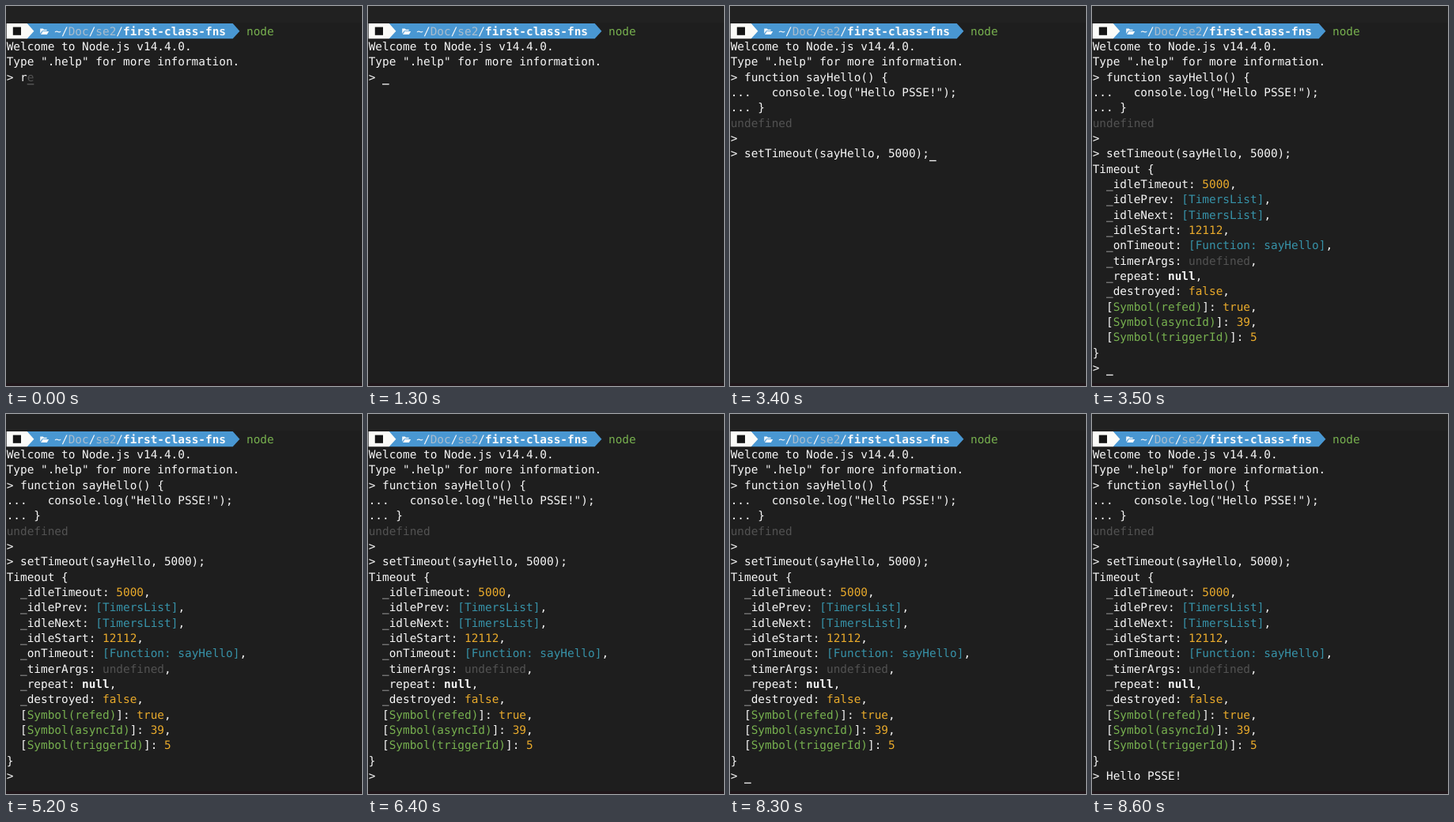
Recreate the animation shown at these times as an HTML page. Size 450x480 px, loop 9800 ms.

```html
<!DOCTYPE html>
<html lang="en">
<head>
<meta charset="utf-8">
<title>Terminal session</title>
<style>
html, body { margin: 0; width: 100%; height: 100%; overflow: hidden; background: #1e1e1e; }
svg { display: block; width: 450px; height: 480px; }
text { font: 14.4px "DejaVu Sans Mono", monospace; white-space: pre; text-rendering: geometricPrecision; }
.w { fill: #f6f6f6; }
.b { fill: #fafafa; font-weight: bold; }
.d { fill: #a9bdce; }
.u { fill: #525252; }
.n { fill: #e9aa2b; }
.t { fill: #3792a8; }
.g { fill: #77b04f; }
</style>
</head>
<body>
<svg id="stage" viewBox="0 0 450 480" xmlns="http://www.w3.org/2000/svg">
  <rect width="450" height="480" fill="#1e1e1e"/>
  <rect width="450" height="21" fill="#212121"/>
  <rect y="476.5" width="450" height="3.5" fill="#20161a"/>
  <path d="M26.7 22H286.7L295.4 31.7 286.7 41.3H26.7Z" fill="#4997d2"/>
  <path d="M.7 22H26.7L35.4 31.7 26.7 41.3H.7Z" fill="#fbfbf8"/>
  <rect x="8.8" y="26.6" width="10.2" height="10.2" fill="#151515"/>
  <path d="M43.2 35V28.6H46.8L47.9 29.8H51.6V31.2H45.8ZM44 36L46.4 32H54.2L51.9 36Z" fill="#f4f8fb"/>
</svg>
<script>
const LOOP = 9800, X0 = 0.7, Y0 = 22, CW = 8.667, LH = 19.333;
const NS = "http://www.w3.org/2000/svg";
const stage = document.getElementById("stage");

function add(parent, tag, attrs) {
  const el = document.createElementNS(NS, tag);
  for (const k in attrs) el.setAttribute(k, attrs[k]);
  return parent.appendChild(el);
}

const colX = col => X0 + col * CW;

// Each part is "style:text", placed on the character grid.
function print(group, row, col, ...parts) {
  for (const part of parts) {
    const str = part.slice(2);
    add(group, "text", { class: part[0], x: colX(col), y: Y0 + row * LH + 14.6 }).textContent = str;
    col += str.length;
  }
}

const layer = () => add(stage, "g", {});
const intro = layer(), draft = layer(), paste = layer(), result = layer(), hello = layer();

print(intro, 0, 7, "w:~/", "d:Doc", "w:/", "d:se2", "w:/", "b:first-class-fns");
print(intro, 0, 35, "g:node");
print(intro, 1, 0, "w:Welcome to Node.js v14.4.0.");
print(intro, 2, 0, 'w:Type ".help" for more information.');
print(intro, 3, 0, "w:>");

print(draft, 3, 2, "w:r", "u:e");

print(paste, 3, 2, "w:function sayHello() {");
print(paste, 4, 0, 'w:...   console.log("Hello PSSE!");');
print(paste, 5, 0, "w:... }");
print(paste, 6, 0, "u:undefined");
print(paste, 7, 0, "w:>");
print(paste, 8, 0, "w:> setTimeout(sayHello, 5000);");

print(result, 9, 0, "w:Timeout {");
[
  ["w:_idleTimeout: ", "n:5000", "w:,"],
  ["w:_idlePrev: ", "t:[TimersList]", "w:,"],
  ["w:_idleNext: ", "t:[TimersList]", "w:,"],
  ["w:_idleStart: ", "n:12112", "w:,"],
  ["w:_onTimeout: ", "t:[Function: sayHello]", "w:,"],
  ["w:_timerArgs: ", "u:undefined", "w:,"],
  ["w:_repeat: ", "b:null", "w:,"],
  ["w:_destroyed: ", "n:false", "w:,"],
  ["w:[", "g:Symbol(refed)", "w:]: ", "n:true", "w:,"],
  ["w:[", "g:Symbol(asyncId)", "w:]: ", "n:39", "w:,"],
  ["w:[", "g:Symbol(triggerId)", "w:]: ", "n:5"]
].forEach((parts, i) => print(result, 10 + i, 2, ...parts));
print(result, 21, 0, "w:}");
print(result, 22, 0, "w:>");

print(hello, 22, 2, "w:Hello PSSE!");

const cursor = add(stage, "rect", { width: CW, height: 1.3 });

// Cursor timeline: start, row, column, visible
const moves = [
  [0, 3, 3, 1], [600, 3, 2, 1], [1100, 3, 2, 0], [1300, 3, 2, 1],
  [1900, 8, 29, 0], [2500, 8, 29, 1], [3100, 8, 29, 0], [3400, 8, 29, 1],
  [3500, 22, 2, 1], [4000, 22, 2, 0], [8400, 23, 0, 0]
];

const show = (el, on) => el.setAttribute("visibility", on ? "visible" : "hidden");

function draw(t) {
  show(draft, t < 600);
  show(paste, t >= 1900);
  show(result, t >= 3500);
  show(hello, t >= 8400);

  let [start, row, col, on] = moves.filter(m => m[0] <= t).pop();
  if (start === 4000) on = Math.floor((t - start) / 600) % 2;
  cursor.setAttribute("x", colX(col));
  cursor.setAttribute("y", Y0 + (row + 1) * LH - 1.2);
  cursor.setAttribute("fill", t < 600 ? "#5a5a5a" : "#f6f6f6");
  show(cursor, on);
}

const begin = performance.now();
function tick() {
  draw((performance.now() - begin) % LOOP);
  requestAnimationFrame(tick);
}
tick();
</script>
</body>
</html>
```
